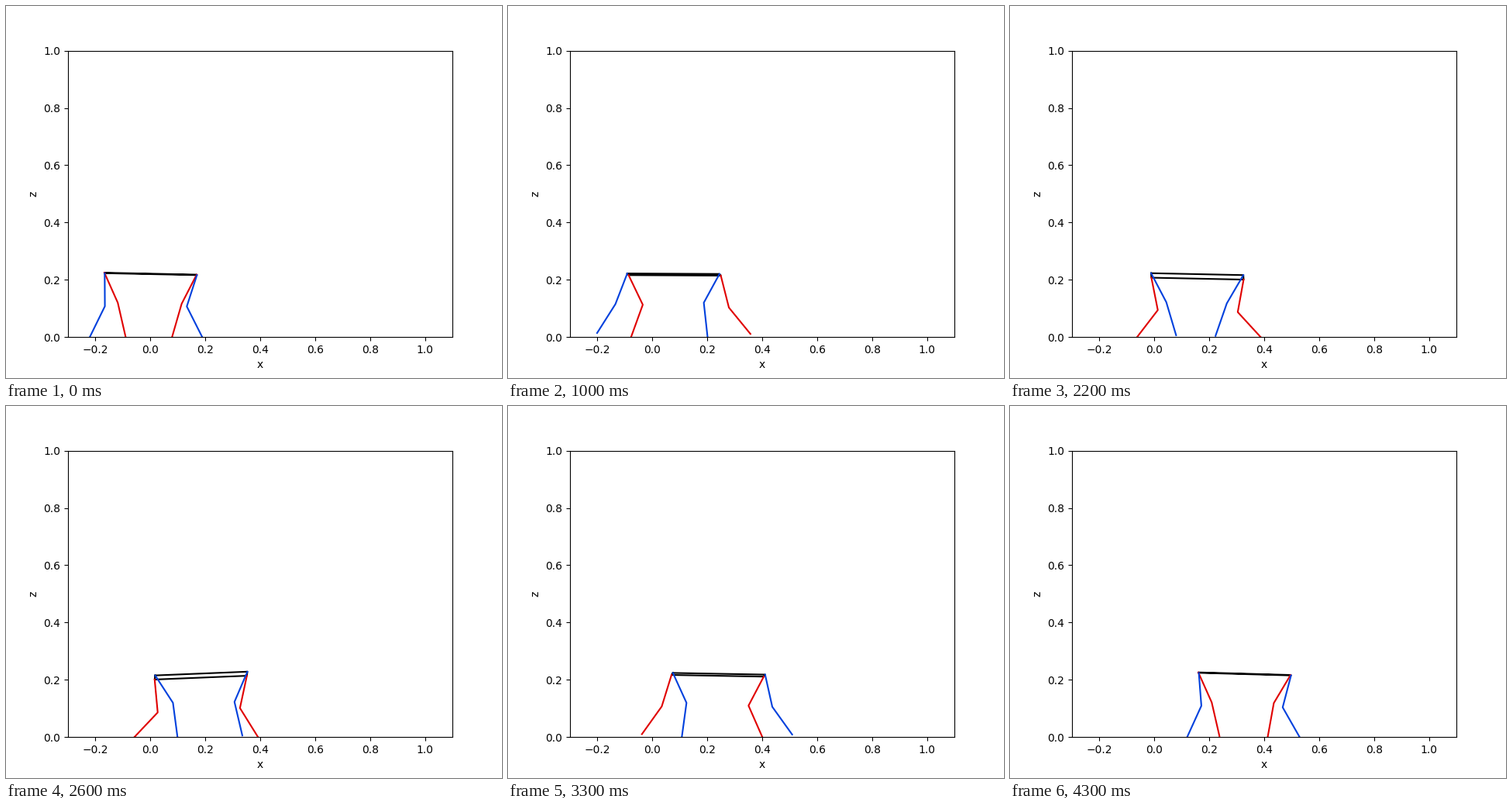
A matplotlib script that plays this animation: 640x480 px, repeating every 4400 ms.

```python
import numpy as np
import matplotlib.pyplot as plt
from matplotlib.animation import FuncAnimation

FRAMES = 44
UPPER, LOWER = 0.1155, 0.1208   # leg link lengths
BODY = 119                      # trunk length in px
STRIDE, SWING = 102, 16         # swing length in px, duration in frames
LIFT = 4.5                      # foot clearance in px
SLIP = 0.43                     # drift of a standing foot, px per frame
RED, BLUE = "#e00000", "#0040dd"

# colour, front leg, foot x at rest, time its swing starts
LEGS = [(RED, True, 211.7, -1), (RED, False, 154.2, 28.4),
        (BLUE, True, 252.9, 21.1), (BLUE, False, 107.8, 7.4)]


def world(x, y):
    """Stage pixels to axes data."""
    return np.array([(x - 79.7) * 1.4 / 496 - 0.3, (427 - y) / 369.6])


def hips(t):
    """Trunk corners: it surges and rolls once per stride, pitches twice."""
    cycle = 2 * np.pi * t / FRAMES
    beat = 2 * cycle
    x = 124.6 + 2.71 * t + 2.9 * np.cos(cycle - 0.57)
    hind = 345.1 + 2.0 * np.cos(beat - 1.49) - 0.7 * np.cos(2 * beat)
    front = 345.4 - 2.3 * np.cos(beat - 1.71) + 1.3 * np.cos(2 * beat)
    yaw = 1.8 * np.sin(cycle - 0.2)
    roll = 2.6 - 3.2 * np.cos(cycle)
    return {(BLUE, False): world(x, hind),
            (BLUE, True): world(x + BODY, front),
            (RED, True): world(x + BODY + yaw, front + roll),
            (RED, False): world(x + yaw, hind + roll)}


def find_foot(t, front, base, start):
    """Front feet shoot out and settle; hind feet do the same in reverse."""
    u = np.clip((t - start) / SWING, 0, 1)
    if not front:
        u = 1 - u
    ease = 1 - (1 - u * u * (3 - 2 * u)) ** 2
    advance = ease if front else 1 - ease
    lift = np.sin(np.pi * min(u / 0.88, 1) ** 1.8)
    return world(base + SLIP * t + STRIDE * advance, 427 - LIFT * lift)


def bend(hip, foot, front):
    """Hip, knee and foot; the foot is dragged along when out of reach."""
    reach = foot - hip
    dist = np.hypot(*reach)
    u = reach / dist
    dist = min(dist, 0.995 * (UPPER + LOWER))
    along = (UPPER**2 - LOWER**2 + dist**2) / (2 * dist)
    off = np.sqrt(UPPER**2 - along**2)
    side = np.array([u[1], -u[0]]) * (1 if front else -1)
    return np.array([hip, hip + along * u + off * side, hip + dist * u])


fig, ax = plt.subplots(figsize=(6.4, 4.8), dpi=100)
ax.set_xlim(-0.3, 1.1)
ax.set_ylim(0, 1)
ax.set_xlabel("x")
ax.set_ylabel("z")
trunk, = ax.plot([], [], color="black")
limbs = [ax.plot([], [], color=leg[0])[0] for leg in LEGS]


def draw(t):
    pos = hips(t)
    corners = list(pos.values())
    trunk.set_data(*np.array(corners + corners[:1]).T)
    for line, (color, front, base, start) in zip(limbs, LEGS):
        foot = find_foot(t, front, base, start)
        line.set_data(*bend(pos[color, front], foot, front).T)
    return [trunk, *limbs]


def reset():
    return draw(0)


anim = FuncAnimation(fig, draw, frames=FRAMES, init_func=reset, interval=100,
                     repeat=True, repeat_delay=0)
plt.show()
```
